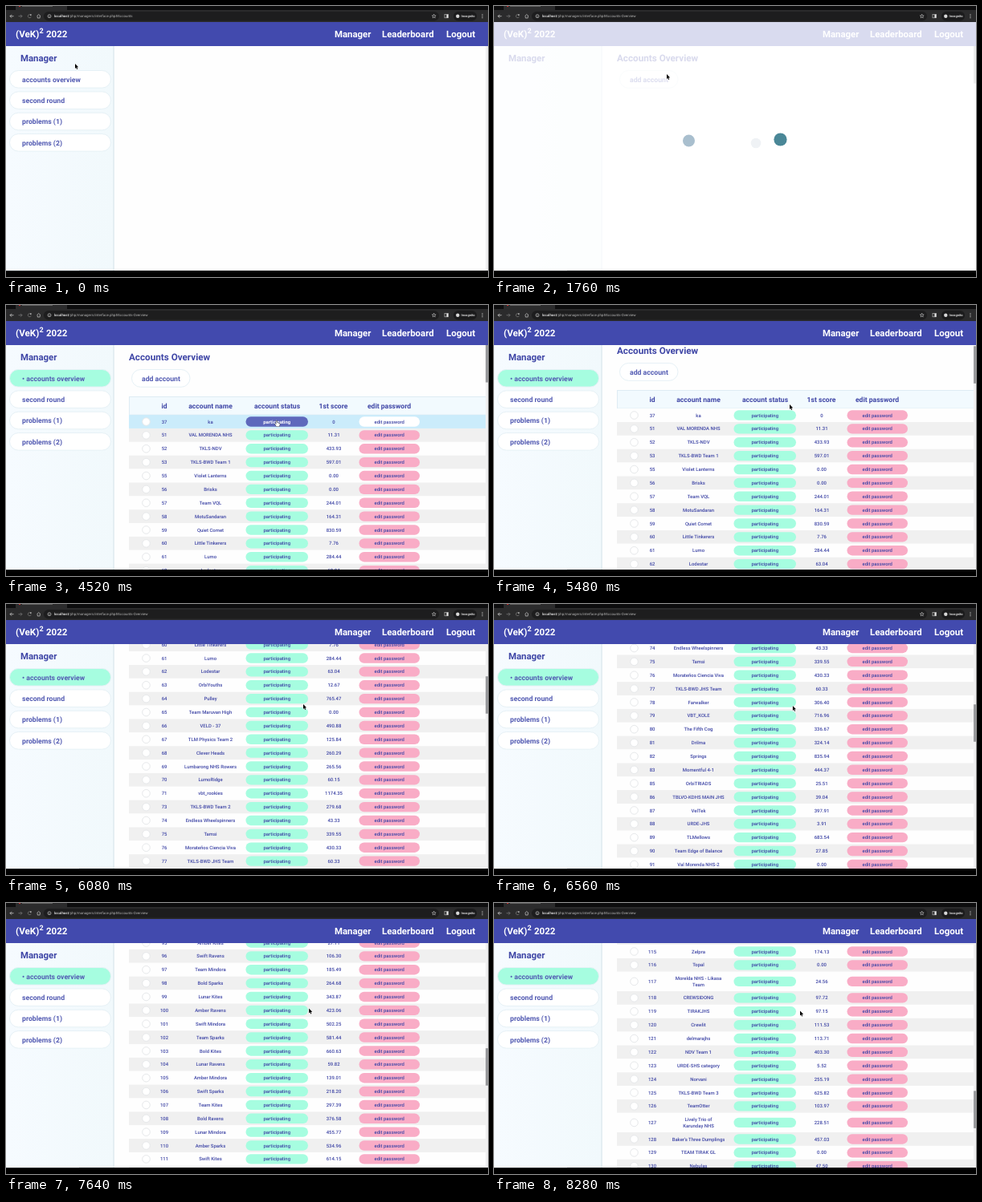
An HTML page with a canvas for the animation above (8320 ms loop, 600 px wide and 338 px high).

```html
<!DOCTYPE html>
<html lang="en">
<head>
<meta charset="utf-8">
<title>Accounts Overview</title>
<style>
html, body { margin: 0; width: 100%; height: 100%; overflow: hidden; background: #000; }
canvas { display: block; width: 600px; height: 338px; }
</style>
</head>
<body>
<canvas id="stage"></canvas>
<script>
const LOOP = 8320, W = 600, H = 338;
const canvas = document.getElementById('stage');
const ctx = canvas.getContext('2d');
const dpr = window.devicePixelRatio || 1;
canvas.width = W * dpr;
canvas.height = H * dpr;

const INK = [63, 70, 166], SOFT = [82, 90, 178], HEADER = [66, 74, 174];
const MINT = [166, 253, 224], PINK = [249, 172, 198], WHITE = [255, 255, 255];
const ROW_H = 16.87, TALL_H = 24.2, FIRST_ROW = 137.1;

// name, score; "/" breaks a name over two lines
const FIRST = `ka,0
VAL MORENDA NHS,11.31
TKLS-NDV,433.93
TKLS-BWD Team 1,597.01
Violet Lanterns,0.00
Brisks,0.00
Team VQL,244.01
MotuSandaran,164.31
Quiet Comet,830.59
Little Tinkerers,7.76
Lumo,284.44
Lodestar,63.04
OrbiYouths,12.67
Pulley,765.47
Team Maruvan High,0.00
VELD - 37,490.88
TLM Physics Team 2,125.84
Clever Heads,260.29
Lumbarong NHS Rowers,265.56
LumoRidge,60.15
vbt_rookies,1174.35
TKLS-BWD Team 2,279.68
Endless Wheelspinners,43.33
Tamsi,339.55
Morateños Ciencia Viva,430.33
TKLS-BWD JHS Team,60.33
Farwalker,306.40
VBT_KOLE,716.96
The Fifth Cog,336.67
Drilma,324.14
Springs,835.94
Momentful 4-1,444.37
OrbiTRIADS,25.51
TBLVO-KDHS MAIN JHS,39.04
VelTek,397.91
URDE-JHS,3.91
TLMellows,683.54
Team Edge of Balance,27.85
Val Morenda NHS-2,0.00
W^4 Torque,132.02
LuminoCrew,389.46
GRAVEL PANDEMONIUM,154.80`;
const LAST = `Zelpra,174.13
Topal,0.00
Morelda NHS - Likasa/Team,24.56
CREWSIDONG,97.72
TIRAKJHS,97.15
Crewlit,111.53
delmarajhs,113.71
NDV Team 1,403.30
URDE-SHS category,5.52
Norvani,255.19
TKLS-BWD Team 3,625.82
TeamOtter,103.97
Lively Trio of/Karunday NHS,228.51
Baker's Three Dumplings,457.03
TEAM TIRAK GL,0.00
Nebulas,47.50
Pebbles,88.21`;

const parse = text => text.split('\n').map(line => line.split(','));

function middleRows() {
  const a = ['Amber', 'Swift', 'Team', 'Bold', 'Lunar'];
  const b = ['Kites', 'Ravens', 'Mindora', 'Sparks'];
  return Array.from({ length: 20 }, (_, i) =>
    [a[i % 5] + ' ' + b[i % 4], ((i * 7919 + 2711) % 68000 / 100).toFixed(2)]);
}

const rows = [];
let nextId = 37, nextY = FIRST_ROW;
for (const [name, score] of [...parse(FIRST), ...middleRows(), ...parse(LAST)]) {
  const lines = name.split('/');
  const h = lines.length > 1 ? TALL_H : ROW_H;
  rows.push({ id: nextId, lines, score, y: nextY, h });
  nextY += h;
  nextId = nextId === 37 ? 51 : nextId + 1;
  if ([54, 72, 84].includes(nextId)) nextId++;
}

const clamp = v => Math.max(0, Math.min(1, v));
const ramp = (t, a, b) => clamp((t - a) / (b - a));
const ease = k => k * k * (3 - 2 * k);
const rgb = (c, a = 1) => `rgba(${c.map(Math.round)},${a})`;
const mix = (a, b, k) => a.map((v, i) => v + (b[i] - v) * k);
const pulse = (t, on, off, fade = 180) => ramp(t, on, on + fade) * (1 - ramp(t, off, off + fade));

function track(keys, t, curve = k => k) {
  let i = 0;
  while (i < keys.length - 2 && t >= keys[i + 1][0]) i++;
  const [a, b] = [keys[i], keys[i + 1]];
  const k = curve(ramp(t, a[0], b[0]));
  return a.slice(1).map((v, j) => v + (b[j + 1] - v) * k);
}

const POINTER = [
  [0, 86, 72], [600, 72, 90], [950, 72, 91], [1760, 215, 85], [2300, 250, 112],
  [2900, 326, 146], [3400, 330, 148], [4350, 331, 148], [5000, 367, 125],
  [5480, 368, 124], [6080, 370, 125], [7080, 374, 129], [8280, 381, 134.5], [8320, 381, 134.5]
];
const SCROLL = [
  [5440, 0], [5480, 8], [6080, 246.7], [6650, 502], [7030, 502], [7080, 519], [8280, 1131], [8320, 1148]
];

function box(x, y, w, h, fill) {
  ctx.fillStyle = fill;
  ctx.fillRect(x, y, w, h);
}

function pill(x, y, w, h, fill, stroke) {
  ctx.beginPath();
  ctx.roundRect(x, y, w, h, h / 2);
  ctx.fillStyle = fill;
  ctx.fill();
  if (stroke) {
    ctx.strokeStyle = stroke;
    ctx.lineWidth = 1;
    ctx.stroke();
  }
}

function dot(x, y, r, fill, stroke) {
  ctx.beginPath();
  ctx.arc(x, y, r, 0, Math.PI * 2);
  if (fill) { ctx.fillStyle = fill; ctx.fill(); }
  if (stroke) { ctx.strokeStyle = stroke; ctx.stroke(); }
}

function line(points, stroke, width = 0.8) {
  ctx.beginPath();
  points.forEach(([x, y], i) => i ? ctx.lineTo(x, y) : ctx.moveTo(x, y));
  ctx.strokeStyle = stroke;
  ctx.lineWidth = width;
  ctx.stroke();
}

// y is the middle of the capitals
function label(text, x, y, size, color, weight = 700, align = 'left') {
  ctx.font = `${weight} ${size}px Roboto, "Open Sans", sans-serif`;
  ctx.textAlign = align;
  ctx.fillStyle = color;
  ctx.fillText(text, x, y + size * 0.35);
}

function drawBrowser(t) {
  box(0, 0, W, 20, '#2b2b2c');
  box(0, 0, W, 5, '#0d0d0e');
  box(12, 0, 64, 5, '#2b2b2c');
  box(16, 0, 2, 1, '#c33');
  box(20, 0, 38, 0.7, '#777');
  pill(47, 7, 492, 11.5, '#1d1d1e');
  const icon = '#c8c8c8';
  line([[9.5, 12.7], [5, 12.7]], icon);
  line([[7, 10.7], [5, 12.7], [7, 14.7]], icon);
  line([[15.5, 12.7], [20, 12.7]], '#777');
  line([[18, 10.7], [20, 12.7], [18, 14.7]], '#777');
  ctx.beginPath();
  ctx.arc(29.3, 12.7, 2, 0.3, 5.4);
  ctx.stroke();
  box(30, 10.4, 1.6, 1.4, icon);
  line([[38.5, 12.5], [40.7, 10.5], [42.9, 12.5], [42.2, 12.5], [42.2, 15], [39.2, 15], [39.2, 12.5]], icon, 0.7);
  ctx.lineWidth = 0.7;
  dot(54, 12.7, 2, null, icon);
  box(53.7, 12.2, 0.6, 1.7, icon);
  const host = 'localhost';
  label(host, 60, 12.6, 4.4, '#f1f1f1', 500);
  const width = ctx.measureText(host).width;
  const page = t < 960 ? '#Accounts' : '#Accounts-Overview';
  label('/php/managers/interface.php' + page, 60 + width, 12.6, 4.4, '#b6b6b6', 400);
  const star = Array.from({ length: 11 }, (_, i) => {
    const r = i % 2 ? 1.1 : 2.6, a = i * Math.PI / 5 - Math.PI / 2;
    return [532.7 + r * Math.cos(a), 12.8 + r * Math.sin(a)];
  });
  line(star, icon, 0.6);
  ctx.strokeRect(546, 10.6, 4.4, 4.2);
  box(548.4, 10.6, 2, 4.2, '#e8e8e8');
  pill(557, 7, 29, 11.5, '#1b1b1c');
  dot(562.3, 12.7, 2.2, '#d8d8d8');
  label('Incognito', 566.5, 12.7, 4.1, '#eee', 500);
  for (const y of [10.7, 12.7, 14.7]) dot(593, y, 0.6, icon);
}

function drawHeader() {
  box(0, 20, W, 30, rgb(HEADER));
  label('(VeK)', 12, 35, 11.6, '#fff');
  label('2', 41.5, 31, 9, '#fff');
  label('2022', 50, 35, 11.5, '#fff');
}

function drawNav() {
  label('Manager', 409, 35.3, 11.4, '#fff');
  label('Leaderboard', 468, 35.3, 11.4, '#fff');
  label('Logout', 548, 35.3, 11.5, '#fff');
}

function drawSidebar(t) {
  const bg = ctx.createLinearGradient(0, 0, 134, 0);
  bg.addColorStop(0, '#f6fbff');
  bg.addColorStop(1, '#f1f9fc');
  box(0, 50, 134, 280, bg);
  box(133, 50, 2, 280, '#e4eef3');
  label('Manager', 18, 65.3, 11.4, rgb(INK));
  const shown = t < 1000 ? 1 : ramp(t, 1780, 2050);
  if (!shown) return;
  const loaded = t > 1000;
  ctx.globalAlpha = shown;
  ['accounts overview', 'second round', 'problems (1)', 'problems (2)'].forEach((text, i) => {
    const y = 91.3 + i * 26.35;
    const active = i ? 0 : loaded ? 1 : 0.6 * ramp(t, 400, 600);
    pill(4.5, y - 10.8, 126, 21.6, rgb(mix(WHITE, MINT, active)), '#e6f1f6');
    label((loaded && !i ? '• ' : '') + text, 20, y + 0.3, 8.7, rgb(SOFT));
  });
  ctx.globalAlpha = 1;
}

function drawRow(row, i, glow) {
  const mid = row.y + row.h / 2;
  const base = i % 2 ? [240, 240, 240] : [254, 254, 254];
  box(153, row.y, 444, row.h, rgb(mix(base, [203, 236, 251], glow)));
  ctx.lineWidth = 1;
  dot(174.5, mid, 4.8, '#fff', '#e6e8ea');
  const text = (s, x, y = mid, color = INK, weight = 500) =>
    label(s, x, y, 5.95, rgb(color), weight, 'center');
  text(row.id, 197);
  row.lines.forEach((s, j) => text(s, 254.5, mid + (j - (row.lines.length - 1) / 2) * 7.4));
  pill(298.5, mid - 6.2, 77.5, 12.4, rgb(mix(MINT, [94, 104, 188], glow)));
  text('participating', 337.2, mid, mix(INK, WHITE, glow), glow > 0.6 ? 700 : 500);
  text(row.score, 408);
  pill(439.5, mid - 6.2, 75.5, 12.4, rgb(mix(PINK, WHITE, glow)));
  text('edit password', 477.2, mid);
}

function drawContent(t, scroll) {
  box(134.5, 50, 462.5, 280, '#fefefe');
  if (t < 1000) return;
  ctx.save();
  ctx.beginPath();
  ctx.rect(135, 50, 462, 280);
  ctx.clip();
  ctx.translate(0, -scroll);
  label('Accounts Overview', 153, 65.3, 11.7, rgb(INK));
  pill(156.5, 80.5, 72.5, 21.8, '#fff', '#e6f1f6');
  label('add account', 169, 91.6, 8.7, rgb(SOFT));
  ctx.globalAlpha = ramp(t, 1780, 2050);
  if (ctx.globalAlpha) {
    box(153, 114, 444, 23, '#f2fafe');
    ctx.strokeStyle = '#deecf4';
    ctx.lineWidth = 1;
    ctx.strokeRect(153.5, 114.5, 446, 22.5);
    const head = (s, x) => label(s, x, 125.8, 8.6, rgb(INK), 700, 'center');
    head('id', 197);
    head('account name', 254.5);
    head('account status', 337.5);
    head('1st score', 407.5);
    head('edit password', 477);
    const glow = { 37: pulse(t, 2840, 4560), 81: pulse(t, 6720, 6990) };
    rows.forEach((row, i) => {
      if (row.y + row.h > scroll + 50 && row.y < scroll + 330) drawRow(row, i, glow[row.id] || 0);
    });
  }
  ctx.restore();
}

function drawScrollbar(t, scroll) {
  box(597, 50, 3, 280, '#f0f0f1');
  if (t > 1700) box(597, 50 + scroll * 0.163, 3, 46.5, '#999a9d');
}

function drawLoader(t) {
  const cover = t < 1760
    ? 0.84 * ramp(t, 960, 1080) - 0.04 * ramp(t, 1700, 1760)
    : 0.8 * (1 - ramp(t, 1760, 2080));
  if (cover <= 0) return;
  box(0, 20, W, 310, `rgba(255,255,255,${cover})`);
  ctx.globalAlpha = clamp(cover / 0.8);
  const turn = (t - 1760) / 1000 * Math.PI * 2;
  const ball = (phase, y, r, color) => dot(299.5 + 57 * Math.cos(turn + phase), y, r, color);
  ball(-1.087, 171, 6.3, '#eff2f5');
  ball(Math.PI, 168, 7.5, '#a9bfce');
  ball(0, 166.5, 8.1, '#4a8797');
  ctx.globalAlpha = 1;
}

function shape(points, fill, stroke) {
  ctx.beginPath();
  points.forEach(([x, y]) => ctx.lineTo(x, y));
  ctx.closePath();
  ctx.lineJoin = 'round';
  ctx.lineWidth = 0.9;
  ctx.strokeStyle = stroke;
  ctx.stroke();
  ctx.fillStyle = fill;
  ctx.fill();
}

function drawPointer(t) {
  const [x, y] = track(POINTER, t, ease);
  const hand = (t > 400 && t < 1150) || (t > 2840 && t < 4650) || (t > 6720 && t < 7120);
  ctx.save();
  ctx.translate(x, y);
  if (hand) {
    shape([[-0.7, 0.3], [0.3, 0.3], [0.5, 2.8], [3.6, 3.6], [3.7, 5.2], [2.9, 7.3],
      [-0.3, 7.3], [-2.3, 4.4], [-1.7, 3.9], [-0.7, 4.8]], '#fff', '#222');
  } else {
    shape([[0, 0], [0, 6], [1.3, 4.8], [2.2, 6.9], [3.2, 6.5], [2.3, 4.4], [4.1, 4.3]], '#000', '#fff');
  }
  ctx.restore();
}

function render(t) {
  ctx.setTransform(dpr, 0, 0, dpr, 0, 0);
  ctx.textRendering = 'geometricPrecision';
  const scroll = track(SCROLL, t)[0];
  box(0, 0, W, H, '#000');
  drawHeader();
  drawContent(t, scroll);
  drawSidebar(t);
  drawScrollbar(t, scroll);
  drawLoader(t);
  drawNav();
  drawBrowser(t);
  box(0, 330, 91, 1, '#222');
  drawPointer(t);
}

let start;
function frame(now) {
  start ??= now;
  render((now - start) % LOOP);
  requestAnimationFrame(frame);
}
render(0);
requestAnimationFrame(frame);
</script>
</body>
</html>
```
